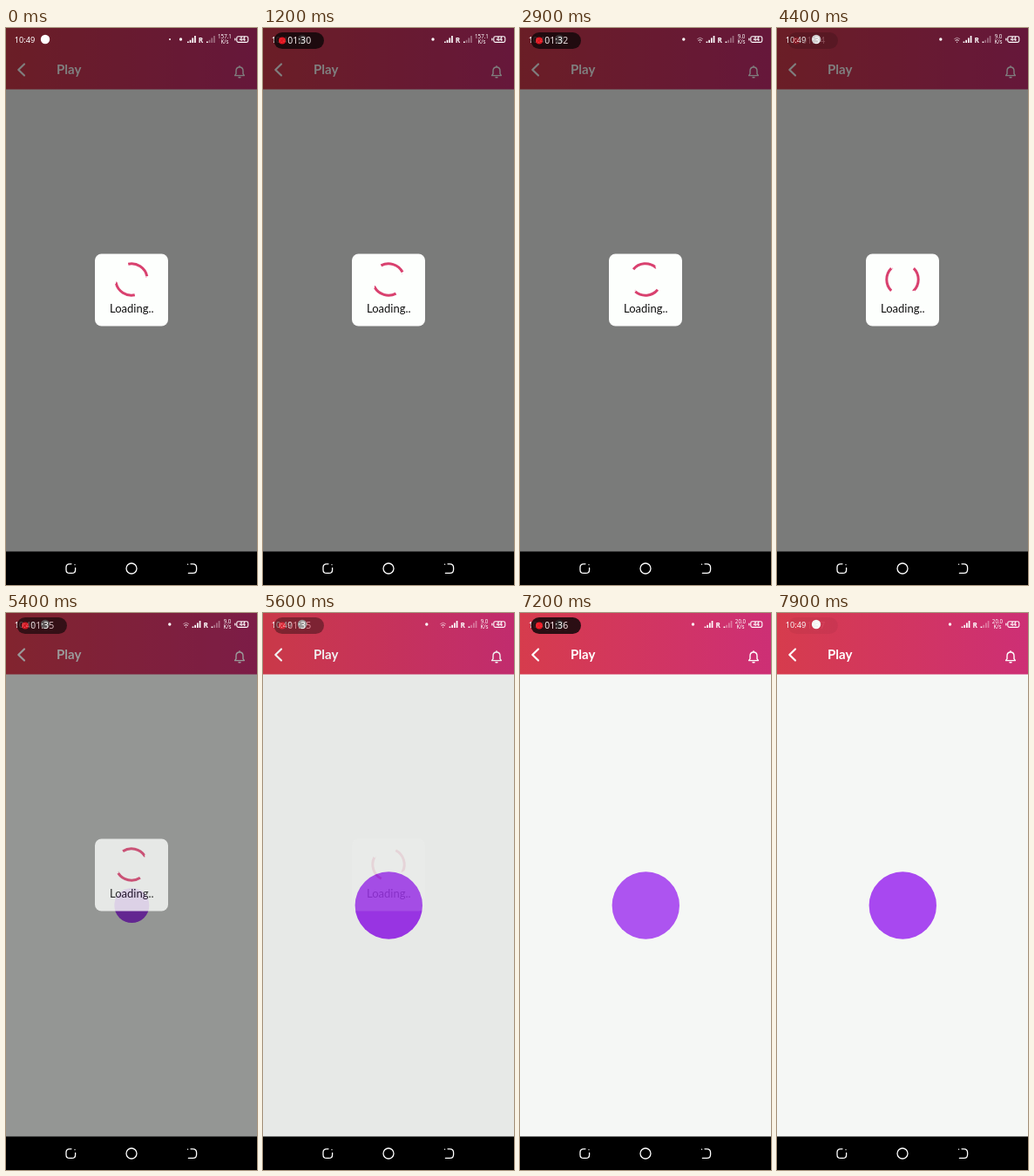
These frames come from a looping animation (288 px wide and 640 px high, 8 s). An HTML page:

```html
<!DOCTYPE html>
<html lang="en">
<head>
<meta charset="utf-8">
<title>Loading screen</title>
<style>
html, body { margin: 0; width: 100%; height: 100%; overflow: hidden; background: #000; }
svg { display: block; width: 100vw; height: 100vh; }
text { font-family: "Noto Sans", "Open Sans", sans-serif; fill: #fff; }
.label { font-family: Lato, sans-serif; }
.line { fill: none; stroke: #fff; stroke-linecap: round; stroke-linejoin: round; }
.speed { font-size: 6.2px; text-anchor: middle; }
</style>
</head>
<body>
<svg viewBox="0 0 288 640">
  <defs>
    <linearGradient id="bar">
      <stop offset="0" stop-color="#d63c4d"/>
      <stop offset="1" stop-color="#cd2f75"/>
    </linearGradient>
    <g id="signal"></g>
  </defs>

  <rect width="288" height="602" fill="#f5f7f5"/>
  <rect width="288" height="70.5" fill="url(#bar)"/>
  <path class="line" d="M21 41.5L14.3 48L21 54.5" stroke-width="2.2"/>
  <text class="label" x="58" y="53" font-size="15" font-weight="700">Play</text>
  <g class="line" stroke-width="1.4">
    <path d="M262.6 54.6H273.4L272 52.6V49.4C272 46.6 270.4 45 268 45S264 46.6 264 49.4V52.6Z"/>
    <path d="M268 43.8V44.4M267 56.8H269"/>
  </g>
  <circle id="ball" cx="144.3" cy="336" fill="#a035f0"/>

  <rect id="dim" width="288" height="602"/>

  <g id="dialog">
    <rect x="102" y="259.5" width="84" height="83" rx="7.5" fill="#fdfffd"/>
    <circle id="spin" cx="144" cy="289" r="18.2" fill="none" stroke="#d9416f" stroke-width="3"
      pathLength="360" stroke-dasharray="90"/>
    <text class="label" x="144.3" y="327.3" font-size="13" text-anchor="middle" style="fill:#111">Loading..</text>
  </g>

  <g id="status">
    <text x="9.8" y="16.5" font-size="9.2">10:49</text>
    <circle cx="45" cy="13" r="5.2" fill="#fff"/>
    <circle id="smallDot" cx="188" cy="13" r="1" fill="#fff"/>
    <circle id="dot" cy="13" r="1.7" fill="#fff"/>
    <g id="wifi" class="line" stroke-width="1">
      <path d="M203.6 12.4Q206.6 9.8 209.6 12.4" opacity=".5"/>
      <path d="M204.9 14.2Q206.6 12.8 208.3 14.2M206.6 16.2V16.4"/>
    </g>
    <g id="cell">
      <g id="sim1"></g>
      <text x="220.8" y="16.8" font-size="8.2" font-weight="700">R</text>
      <g id="sim2"></g>
    </g>
    <text id="rate" class="speed" y="12.2"></text>
    <text id="unit" class="speed" y="18.4">K/s</text>
    <rect class="line" x="264.8" y="9.8" width="13" height="6.6" rx="1.8" stroke-width="1.1"/>
    <path class="line" d="M262.9 12.2V14" stroke-width="1.2"/>
    <text x="271.3" y="15.4" font-size="6.2" font-weight="700" text-anchor="middle">44</text>
  </g>

  <g id="rec">
    <rect x="12.5" y="5" width="57.5" height="19" rx="9.5" fill="#12080a"/>
    <circle cx="22" cy="14.5" r="4" fill="#f0141e"/>
    <text id="timer" x="28.3" y="18.3" font-size="10.5"></text>
  </g>

  <rect y="601.5" width="288" height="38.5"/>
  <g class="line" stroke-width="1.3">
    <path d="M75 615.8H73Q69 615.8 69 619.8V622.4Q69 626.4 73 626.4H75.6Q79.6 626.4 79.6 622.4V620.4M79 616.6V616.7"/>
    <circle cx="144" cy="621" r="6"/>
    <path d="M212 615.8H214.4Q218.6 615.8 218.6 620V622.2Q218.6 626.4 214.4 626.4H209.4M208.6 616.2V616.3"/>
  </g>
</svg>
<script>
const LOOP = 8000, STEP = 100;
const $ = id => document.getElementById(id);
const set = (id, attrs) => {
  for (const key in attrs) $(id).setAttribute(key, attrs[key]);
};
const clamp = v => Math.max(0, Math.min(1, v));

// Piecewise linear value from [time, value] pairs
function track(keys, t) {
  if (t <= keys[0][0]) return keys[0][1];
  for (let i = 1; i < keys.length; i++) {
    const [t0, v0] = keys[i - 1], [t1, v1] = keys[i];
    if (t <= t1) return v0 + (v1 - v0) * (t - t0) / (t1 - t0);
  }
  return keys[keys.length - 1][1];
}

const turn = [[0, -102], [1200, 242], [2900, 760], [4400, 1215], [5400, 1497], [6000, 1677]];
const fade = [[5300, 1], [5400, .79], [5500, .45], [5600, .12], [5700, 0]];
const grow = [[5200, 0], [5400, 20], [5600, 38.7]];
const network = [
  { from: 0, dot: 200.5, shift: 0, rate: "157.1", x: 251 },
  { from: 500, dot: 195, shift: 0, rate: "157.1", x: 251 },
  { from: 2300, dot: 187.8, shift: 5.6, rate: "9.0", x: 254, wifi: true },
  { from: 5700, dot: 198.5, shift: 3.6, rate: "20.0", x: 253 }
];

function drawBars(id, x, lit) {
  $(id).innerHTML = [1.5, 3.2, 5.6, 8].map((h, i) =>
    `<rect x="${x + i * 2.7}" y="${17 - h}" width="1.7" height="${h}" fill="#fff" opacity="${i < lit ? 1 : .35}"/>`
  ).join("");
}

function draw(t) {
  const veil = track(fade, t);
  set("dim", { opacity: veil / 2 });
  set("dialog", { opacity: veil });
  set("spin", { transform: `rotate(${track(turn, t)} 144 289)` });
  set("ball", {
    r: track(grow, t),
    opacity: .77 + .22 * Math.cos(Math.PI * (t - 7600) / 1000)
  });

  const net = network.filter(n => n.from <= t).pop();
  set("smallDot", { opacity: net.from ? 0 : 1 });
  set("dot", { cx: net.dot });
  set("wifi", { opacity: net.wifi ? 1 : 0 });
  set("cell", { transform: `translate(${net.shift})` });
  set("rate", { x: net.x });
  set("unit", { x: net.x });
  $("rate").textContent = net.rate;

  const pulse = (1 + Math.cos(Math.PI * (t - 1080) / 1000)) / 2;
  set("rec", { opacity: .88 * clamp((pulse - .03) / .95) });
  $("timer").textContent = "01:" + Math.floor(t / 1000 + 29.7);
}

function tick() {
  const t = performance.now() % LOOP;
  draw(Math.floor(t / STEP) * STEP);
  requestAnimationFrame(tick);
}

drawBars("sim1", 208, 4);
drawBars("sim2", 230, 1);
tick();
</script>
</body>
</html>
```
